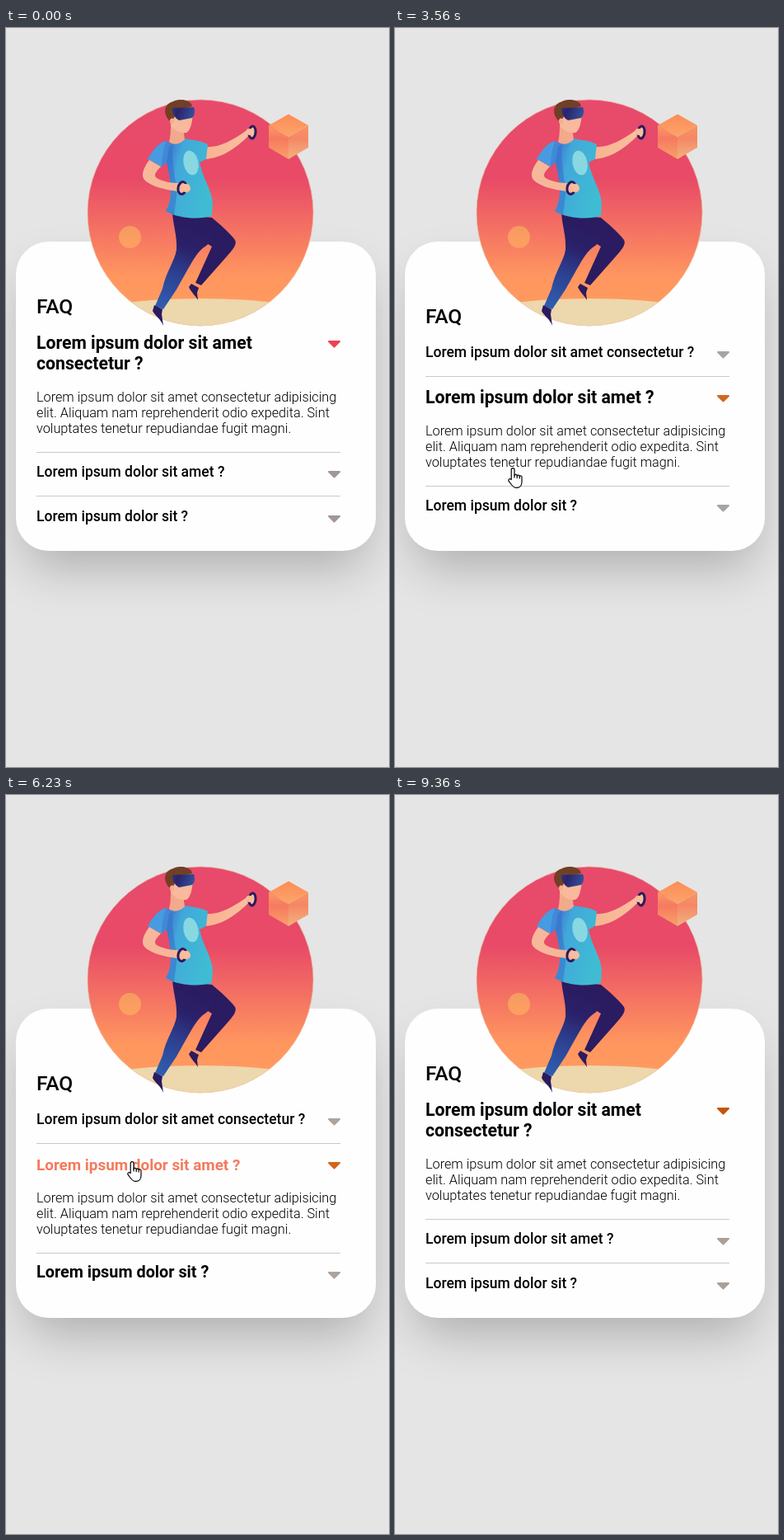
Recreate the animation shown at these times as an HTML page with a canvas. Size 465 by 896 pixels, loop 9790 ms.

```html
<!DOCTYPE html>
<html lang="en">
<head>
<meta charset="utf-8">
<title>FAQ accordion</title>
<style>
html, body { margin: 0; width: 100%; height: 100%; overflow: hidden; background: #e5e5e5; }
.card {
  position: absolute; left: 12px; top: 259px; width: 437px; height: 375px;
  border-radius: 40px; background: #fefefe;
  box-shadow: 0 30px 60px -12px rgba(0,0,0,.25);
}
canvas { position: absolute; left: 0; top: 0; width: 465px; height: 896px; }
</style>
</head>
<body>
<div class="card"></div>
<canvas id="stage" width="465" height="896"></canvas>
<script>
const ctx = document.getElementById('stage').getContext('2d');
const LOOP = 9790, LEFT = 37, RIGHT = 406;
const FADE = 180, GROW = 220;
const CLOSED_SIZE = 17.5, OPEN_SIZE = 21.2, ANSWER_SIZE = 16.24;

const TITLES = [
  'Lorem ipsum dolor sit amet consectetur ?',
  'Lorem ipsum dolor sit amet ?',
  'Lorem ipsum dolor sit ?'
];
const WRAPPED = ['Lorem ipsum dolor sit amet', 'consectetur ?'];
const ANSWER = [
  'Lorem ipsum dolor sit amet consectetur adipisicing',
  'elit. Aliquam nam reprehenderit odio expedita. Sint',
  'voluptates tenetur repudiandae fugit magni.'
];

// Baselines and divider rows, by index of the open item
const LAYOUTS = [
  { heading: 346, titles: [389, 544, 598], answer: 453, rules: [514, 567] },
  { heading: 358, titles: [399, 455, 585], answer: 494, rules: [422, 555] },
  { heading: 358, titles: [399, 452, 508], answer: 547, rules: [422, 475] }
];

// Which item opens when, with its arrow colours
const STATES = [
  { at: 0, open: 0, on: '#ee434f', off: ['#a2959b', '#a2959b', '#a2959b'] },
  { at: 3030, open: 1, on: '#d0691f', off: ['#a5a5a5', '#a5a5a5', '#a5a5a5'] },
  { at: 4350, open: 2, on: '#b8602a', off: ['#b3aa9f', '#c2a9ba', '#b3aa9f'] },
  { at: 6190, open: 1, on: '#d3641e', off: ['#aea39c', '#aea39c', '#aea39c'] },
  { at: 7650, open: 0, on: '#c6530d', off: ['#a9a099', '#a9a099', '#a9a099'] }
];

// Pointer tip: time, x, y
const PATH = [
  [560, 434, 900], [1000, 330, 640], [1350, 200, 410], [1550, 164, 369],
  [2010, 164, 369], [2400, 156, 395], [2880, 144, 527], [3490, 144, 527],
  [3560, 143, 533], [3900, 146, 565], [4120, 146, 572], [5140, 146, 572],
  [5200, 146, 574], [5500, 150, 540], [5950, 153, 444], [6840, 153, 444],
  [7030, 154, 418], [7300, 155, 374], [7500, 154, 388], [8130, 154, 388],
  [8500, 230, 560], [9000, 390, 850], [9150, 405, 871], [9360, 405, 900]
];

const clamp = v => Math.max(0, Math.min(1, v));
const mix = (a, b, k) => a + (b - a) * k;
const stateIndex = t => STATES.findLastIndex(s => t >= s.at);

function pointerAt(t) {
  const i = PATH.findIndex(p => p[0] > t);
  if (i < 1) return null;
  const [a, b] = [PATH[i - 1], PATH[i]];
  const k = (t - a[0]) / (b[0] - a[0]);
  return { x: mix(a[1], b[1], k), y: mix(a[2], b[2], k) };
}

function isHovered(item, t) {
  const p = pointerAt(t);
  if (!p || p.x < LEFT || p.x > RIGHT) return false;
  const open = STATES[stateIndex(Math.max(0, t))].open;
  const base = LAYOUTS[open].titles[item];
  const top = base - (open === item ? 19 : 16);
  const height = open !== item ? 21 : item === 0 ? 49 : 25;
  return p.y >= top && p.y < top + height;
}

function hoverAmount(item, t) {
  const samples = 9;
  let hits = 0;
  for (let i = 0; i < samples; i++) hits += isHovered(item, t - FADE * i / samples);
  return hits / samples;
}

function growth(item, t) {
  const i = stateIndex(t);
  const now = +(STATES[i].open === item);
  const before = i ? +(STATES[i - 1].open === item) : now;
  return mix(before, now, 1 - (1 - clamp((t - STATES[i].at) / GROW)) ** 2.3);
}

function text(str, y, size, weight, color = '#000') {
  ctx.font = `${weight} ${size}px Roboto, sans-serif`;
  ctx.fillStyle = color;
  ctx.fillText(str, LEFT, y);
}

function gradient(x0, y0, x1, y1, ...stops) {
  const g = ctx.createLinearGradient(x0, y0, x1, y1);
  stops.forEach(([at, color]) => g.addColorStop(at, color));
  return g;
}

function shape(d, fill) {
  ctx.fillStyle = fill;
  ctx.fill(new Path2D(d));
}

function ellipse(x, y, rx, ry, fill, turn = 0) {
  ctx.beginPath();
  ctx.ellipse(x, y, rx, ry, turn, 0, Math.PI * 2);
  ctx.fillStyle = fill;
  ctx.fill();
}

function ring(x, y, rx, ry, turn) {
  ctx.beginPath();
  ctx.ellipse(x, y, rx, ry, turn, 0, Math.PI * 2);
  ctx.strokeStyle = '#2b1b5e';
  ctx.lineWidth = 3;
  ctx.stroke();
}

function drawScene() {
  ctx.save();
  ctx.beginPath();
  ctx.arc(236, 224, 137.2, 0, Math.PI * 2);
  ctx.clip();
  ctx.fillStyle = gradient(0, 87, 0, 361, [0, '#e84a6b'], [.35, '#e84a67'], [.78, '#ff965f'], [1, '#ff9d5e']);
  ctx.fillRect(99, 86, 275, 276);
  ellipse(236, 351, 145, 23, '#edd7ad');
  ctx.restore();
  ctx.beginPath();
  ctx.arc(236, 224, 137, 0, Math.PI * 2);
  ctx.strokeStyle = 'rgba(232,205,175,.6)';
  ctx.lineWidth = 1;
  ctx.stroke();
  ellipse(150.5, 253.5, 13.5, 13.5, gradient(0, 240, 0, 267, [0, '#f79a62'], [1, '#fda05f']));

  shape('M343 104.5L367 118L343 132L319 118Z', gradient(0, 105, 0, 132, [0, '#fe8c56'], [1, '#faa56c']));
  shape('M319 118L343 132V159L319 145Z', gradient(0, 118, 0, 158, [0, '#fb9a64'], [.4, '#f67a5f'], [1, '#f99f68']));
  shape('M367 118L343 132V159L367 145Z', gradient(0, 118, 0, 158, [0, '#fb9461'], [.4, '#f58766'], [1, '#f2b27d']));
}

function drawLegs() {
  shape('M215 226L250 230C259 237 273 250 278 257C281 262 275 269 268 277L237 312L230 309L250 265L236 256Z', '#2b1b60');
  shape('M202 224C212 229 235 231 250 230C252 245 251 259 243 264C233 270 227 282 221 292L207 317L191 341L181 337L190 316C194 296 205 282 207 269C208 252 203 240 202 224Z',
    gradient(228, 235, 187, 335, [0, '#2b1b60'], [.3, '#2a216a'], [.6, '#2d3f8f'], [1, '#2f5cae']));
  shape('M180 336L190 341L189 347L191 361C188 353 181 349 178 343Z', '#2b1b60');
  shape('M225 310L234 315L232 321L233 330C230 324 225 321 222 314Z', '#2b1b60');
}

function drawBody() {
  const skin = gradient(168, 0, 300, 0, [0, '#f7b79b'], [.6, '#f8b493'], [1, '#f9c1a0']);
  shape('M241 144C258 146 275 136 291 125C295 119 302 118 303 124C304 130 299 134 294 131C281 144 263 158 241 159Z', skin);
  ring(299, 126.5, 4, 7.5, .1);
  ellipse(296, 126, 3.5, 4, '#f9bd9c');

  shape('M194 137C203 142 212 140 217 134C228 136 238 137 245 141L243 159L235 163C238 180 250 197 251 212L250 228C236 232 211 232 194 222C202 208 202 192 195 163L189 168L172 159C179 148 184 140 194 137Z',
    gradient(174, 160, 250, 180, [0, '#4595dc'], [.3, '#3f85d3'], [.45, '#42a8da'], [1, '#3fbcd3']));
  shape('M194 137C190 148 189 160 189 168L172 159C179 148 184 140 194 137Z', '#489be0');
  shape('M203 141C201 154 204 178 208 196L204 227L194 222C202 208 202 192 195 163L198 144Z', 'rgba(54,112,202,.55)');
  ellipse(224.5, 163.5, 9, 15, '#88d8e2', -.2);

  shape('M174 160L188 168C181 175 179 179 183 182C192 187 202 188 211 188C219 185 225 191 224 196C221 201 213 202 208 198C191 196 174 191 168 184C163 178 168 168 174 160Z', skin);
  ring(214, 194, 5, 7.5, .2);
  ellipse(218, 194, 5.5, 5, '#f9bd9c');
}

function drawHead() {
  shape('M200 114L215 122L217 135C211 142 203 142 198 138C200 131 200 122 200 114Z', '#f3a98c');
  shape('M200 105L227 104C226 112 225 124 219 127C211 128 204 124 200 118Z', '#f8b99c');
  shape('M198 112C190 103 192 92 203 89C211 85 225 87 226 95L207 99C206 106 204 110 201 113Z', '#713f25');
  shape('M202 97L228 96C230 101 229 106 226 109L210 112C205 109 202 104 202 97Z',
    gradient(200, 98, 229, 108, [0, '#283b8d'], [.3, '#2a2369'], [1, '#33559f']));
  ellipse(201.5, 113, 2.5, 3.6, '#f6ad91');
}

function drawArrow(y, color) {
  ctx.fillStyle = ctx.strokeStyle = color;
  ctx.lineWidth = 2;
  ctx.lineJoin = 'round';
  const p = new Path2D(`M392 ${y + 1}H405L398.5 ${y + 7.5}Z`);
  ctx.fill(p);
  ctx.stroke(p);
}

function drawList(t) {
  const state = STATES[stateIndex(t)];
  const layout = LAYOUTS[state.open];
  text('FAQ', layout.heading, 24.6, 500);
  TITLES.forEach((title, i) => {
    const open = state.open === i;
    const base = layout.titles[i];
    const grown = growth(i, t);
    const tint = hoverAmount(i, t);
    const size = mix(CLOSED_SIZE, OPEN_SIZE, grown);
    const weight = Math.round(mix(500, 700, grown));
    const color = `rgb(${244 * tint},${122 * tint},${92 * tint})`;
    const lines = open && i === 0 ? WRAPPED : [title];
    lines.forEach((line, n) => text(line, base + n * 25, size, weight, color));
    drawArrow(base - (open ? 10 : 7), open ? state.on : state.off[i]);
  });
  ANSWER.forEach((line, n) => text(line, layout.answer + n * 19, ANSWER_SIZE, 300));
  ctx.fillStyle = '#c9c9c9';
  layout.rules.forEach(y => ctx.fillRect(LEFT, y, RIGHT - LEFT, 1));
}

const ARROW = new Path2D('M0 0V24L5.2 19L9.4 29L13.2 27.3L9 17.6H16Z');
const HAND = new Path2D('M4.2 14.5V2.6a1.9 1.9 0 0 1 3.8 0V9.3a1.7 1.7 0 0 1 3.2.6a1.6 1.6 0 0 1 3 .8a1.5 1.5 0 0 1 2.8 1V17c0 4-2 7.4-5.6 7.4H9.6C6.4 24.4 4.6 21 1 16.2C.1 14.6 2 13 3.3 14Z');
const KNUCKLES = new Path2D('M8 9V12.5M11.2 10V13M14.2 11V13.5');

function drawPointer(t) {
  const p = pointerAt(t);
  if (!p) return;
  const { open } = STATES[stateIndex(t)];
  const overList = p.x >= LEFT && p.x <= RIGHT && p.y > (open ? 382 : 369) && p.y < 615;
  ctx.save();
  ctx.lineJoin = 'round';
  if (overList) {
    ctx.translate(Math.round(p.x) - 6, Math.round(p.y));
    ctx.fillStyle = '#fff';
    ctx.fill(HAND);
    ctx.strokeStyle = '#000';
    ctx.lineWidth = 1.2;
    ctx.stroke(HAND);
    ctx.stroke(KNUCKLES);
  } else {
    ctx.translate(Math.round(p.x), Math.round(p.y));
    ctx.strokeStyle = '#fff';
    ctx.lineWidth = 1.5;
    ctx.stroke(ARROW);
    ctx.fillStyle = '#000';
    ctx.fill(ARROW);
  }
  ctx.restore();
}

function render(now) {
  const t = now % LOOP;
  ctx.clearRect(0, 0, 465, 896);
  drawScene();
  drawLegs();
  drawBody();
  drawHead();
  drawList(t);
  drawPointer(t);
}

const start = performance.now();
function tick() {
  render(performance.now() - start);
  requestAnimationFrame(tick);
}
tick();
</script>
</body>
</html>
```
